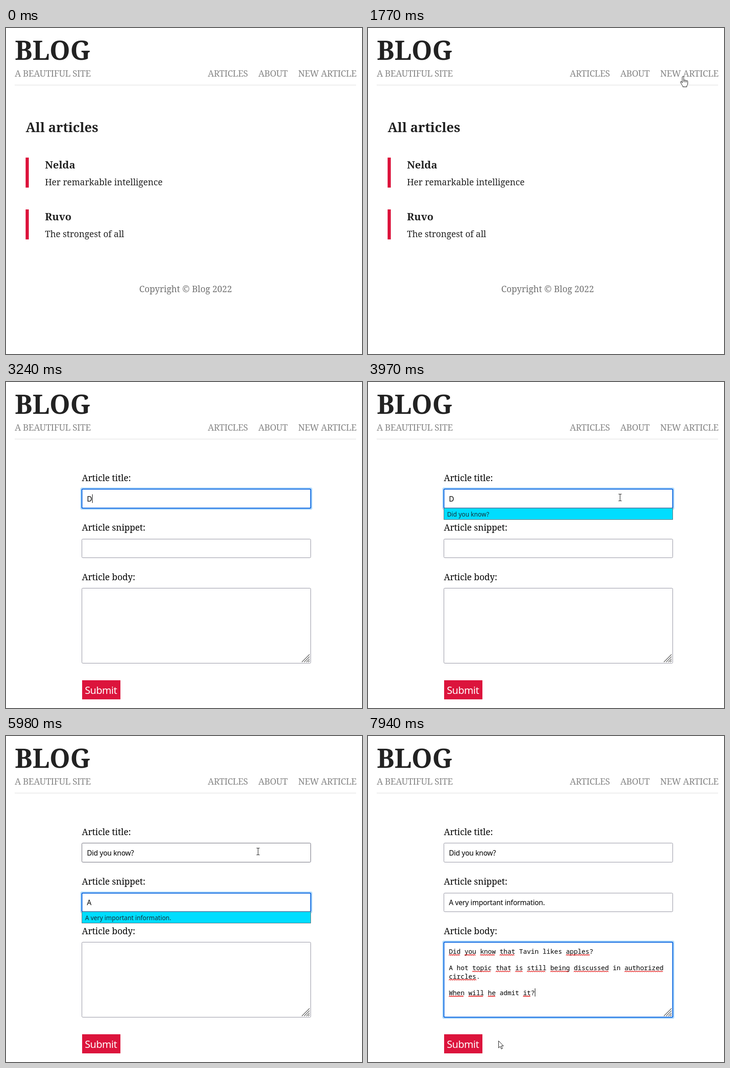
Animation of 781 by 717 pixels, one loop 8 s. Source, as an HTML page:

```html
<!DOCTYPE html>
<html lang="en">
<head>
<meta charset="utf-8">
<title>Blog</title>
<style>
  html, body { margin: 0; width: 100%; height: 100%; overflow: hidden; background: #fff; }
  svg { display: block; }
  text { white-space: pre; fill: #000; font: 19.2px "Noto Serif", serif; }
  .h1 { font-size: 57.6px; font-weight: 700; fill: #222; }
  .h2 { font-size: 28.8px; font-weight: 700; fill: #222; }
  .h3 { font-size: 22.46px; font-weight: 700; fill: #222; }
  .p { fill: #222; }
  .nav { font-weight: 300; fill: #868686; letter-spacing: -.33px; }
  .foot { fill: #707070; text-anchor: middle; }
  .in { font: 15.5px "Noto Sans", sans-serif; letter-spacing: -.22px; }
  .opt { font: 13.5px "Noto Sans", sans-serif; fill: #15303a; }
  .mono { font: 14.27px "Noto Sans Mono", monospace; }
  .btn { font: 22px "Noto Sans", sans-serif; letter-spacing: -.5px; fill: #fff; }
  .field { fill: #fff; stroke: #8f8f9d; }
  .halo { fill: #b5dcfb; }
  .pointer { fill: #fff; stroke: #111; stroke-linejoin: round; }
</style>
</head>
<body>
<svg width="781" height="717" viewBox="0 0 781 717">
  <text class="h1" x="19.2" y="70">BLOG</text>
  <text class="nav" x="19.2" y="107">A BEAUTIFUL SITE</text>
  <text class="nav" x="442.7" y="107">ARTICLES</text>
  <text class="nav" x="553.5" y="107">ABOUT</text>
  <text class="nav" x="641" y="107">NEW ARTICLE</text>
  <path d="M19 125.5H768" stroke="#ddd"/>

  <g id="list">
    <text class="h2" x="43.2" y="229">All articles</text>
    <path d="M43 285h7v66h-7zM43 399h7v66h-7z" fill="#dc143c"/>
    <text class="h3" id="first" x="85.4" y="309">Nelda</text>
    <text class="p" x="85.4" y="346">Her remarkable intelligence</text>
    <text class="h3" id="second" x="85.4" y="423">Ruvo</text>
    <text class="p" x="85.4" y="460">The strongest of all</text>
    <text class="foot" x="394" y="581">Copyright © Blog 2022</text>
  </g>

  <g id="form">
    <text x="166.5" y="218">Article title:</text>
    <text x="166.5" y="327">Article snippet:</text>
    <text x="166.5" y="435.5">Article body:</text>
    <rect class="halo" id="halo" x="163" width="509" rx="4"/>
    <rect class="field" id="title" x="166.5" y="235.5" width="502" height="42" rx="2"/>
    <rect class="field" id="snippet" x="166.5" y="345.5" width="502" height="41" rx="2"/>
    <rect class="field" id="body" x="166.5" y="453.5" width="502" height="165" rx="2"/>
    <path d="M649 616l17-17M654 616l12-12M659 616l7-7M663 616l3-3" stroke="#555" stroke-width="1.2"/>
    <text class="in" id="titleText" x="177.5" y="263"></text>
    <text class="in" id="snippetText" x="177.5" y="372"></text>
    <g id="bodyText"></g>
    <g id="drop">
      <rect id="dropBox" x="166.5" y="277.5" width="502" height="25" stroke="#5f7077"/>
      <text class="opt" id="dropText" x="173.5" y="296"></text>
    </g>
    <rect id="caret" width="1"/>
    <rect x="167" y="656" width="84" height="42" fill="#dc143c"/>
    <text class="btn" x="173" y="685.5">Submit</text>
  </g>

  <g id="cursor">
    <path class="pointer" id="arrow" d="M.5 .5V16L4 12.6L6.5 18.3L9 17.2L6.5 11.7H11.2Z"/>
    <path class="pointer" id="hand" d="M-1.7 14V1.5Q-1.6 -.3 0 -.3T1.7 1.5V8Q3.2 6.3 4.7 8.2Q6.3 6.8 7.7 9Q10.5 8 10.5 11.5V15Q10.5 18 8.4 20V22.5H-.3V20.5Q-2.8 18-5.2 13Q-6 10.6-4.4 10.4Q-3 10.3-1.7 13M1.7 8V12M4.7 8.4V12.4M7.7 9.2V12.6"/>
    <path id="beam" d="M-3.5 -7.5H-1L0 -6.5L1 -7.5H3.5M0 -6.5V6.5M-3.5 7.5H-1L0 6.5L1 7.5H3.5" fill="none" stroke="#222" stroke-width="1.1"/>
  </g>
</svg>
<script>
const $ = id => document.getElementById(id);
const show = (id, on) => $(id).style.display = on ? '' : 'none';
const set = (id, attrs) => { for (const k in attrs) $(id).setAttribute(k, attrs[k]); };
const within = (t, ...spans) => spans.some(([a, b]) => t >= a && t < b);

const LOOP = 8000, OPEN = 2170, CHAR = 8.562;
const TITLE = 'Did you know?', SNIPPET = 'A very important information.';

// Article body, with wavy underlines from the spell checker
const known = ['Tavin', 'likes', 'A', 'hot', 'in', 'admit'];
const lines = [
  [479, 'Did you know that Tavin likes apples?'],
  [515.3, 'A hot topic that is still being discussed in authorized'],
  [533.5, 'circles.'],
  [569.8, 'When will he admit it?']
];
$('bodyText').innerHTML = lines.map(([y, line]) => {
  let wave = '';
  for (const m of line.matchAll(/\w+/g)) {
    if (known.includes(m[0])) continue;
    wave += `M${177.5 + m.index * CHAR} ${y + 3.5}`;
    for (let x = 0; x < m[0].length * CHAR - 3; x += 4) wave += 'l2 -2l2 2';
  }
  return `<text class="mono" x="177.5" y="${y}">${line}</text>
    <path d="${wave}" fill="none" stroke="#e01010" stroke-width="1.1"/>`;
}).join('');

// Mouse path: time, x, y of the hot spot
const moves = [
  [70, 320, 475], [350, 323, 424], [620, 323, 424], [950, 328, 347],
  [1280, 328, 347], [1620, 689, 93], [1770, 691, 107], [OPEN, 691, 107],
  [2570, 557, 250], [2770, 553, 246], [3309, 553, 246], [3310, 553, 254],
  [7320, 436, 508], [7940, 286, 670]
];
const ease = u => u * u * (3 - 2 * u);
function mouseAt(t) {
  if (t >= 3310 && t < 7320) return [553, 254];
  const i = moves.findIndex(m => m[0] > t);
  if (i < 1) return moves[i < 0 ? moves.length - 1 : 0].slice(1);
  const [a, x, y] = moves[i - 1], [b, x2, y2] = moves[i];
  const u = ease((t - a) / (b - a));
  return [x + (x2 - x) * u, y + (y2 - y) * u];
}

function drawCursor(t) {
  const [x, y] = mouseAt(t);
  const onFirst = y > 285 && y < 351, onSecond = y > 399 && y < 465;
  const listed = t < OPEN, seen = within(t, [70, 3240], [3310, 4590], [5650, 6250], [7320, LOOP]);
  const hand = y < 111 || listed && (onFirst || onSecond);
  const overTitle = !listed && y > 236 && y < 278;
  const beam = overTitle || !listed && y > 453 && y < 620;
  show('cursor', seen);
  show('hand', hand);
  show('beam', beam);
  show('arrow', !hand && !beam);
  set('cursor', { transform: `translate(${x.toFixed(1)} ${y.toFixed(1)})` });
  $('first').style.fill = seen && onFirst ? '#dc143c' : '';
  $('second').style.fill = seen && onSecond ? '#dc143c' : '';
  return overTitle && t < 6850;
}

function drawForm(t, hover) {
  const focus = within(t, [2970, 4590]) ? 'title' : within(t, [4590, 6320]) ? 'snippet' : t >= 6320 ? 'body' : '';
  for (const id of ['title', 'snippet', 'body']) {
    const on = id === focus;
    $(id).style.stroke = on ? '#0060df' : id === 'title' && hover ? '#676774' : '';
    $(id).style.strokeWidth = on ? 2 : 1;
  }
  show('halo', focus);
  if (focus) set('halo', { y: $(focus).y.baseVal.value - 3.5, height: $(focus).height.baseVal.value + 7 });

  $('titleText').textContent = t < 3240 ? '' : t < 4320 ? 'D' : TITLE;
  $('snippetText').textContent = t < 5590 ? '' : t < 6250 ? 'A' : SNIPPET;
  show('bodyText', t >= 6850);

  const second = t > 5000;
  show('drop', within(t, [3310, 4320], [5720, 6250]));
  set('dropBox', { y: second ? 386.5 : 277.5, fill: within(t, [3970, 4320], [5980, 6250]) ? '#00ddff' : '#fff' });
  set('dropText', { y: second ? 405 : 296 });
  $('dropText').textContent = second ? SNIPPET : TITLE;

  show('caret', within(t, [3040, 3510], [4040, 4590], [4660, 5190], [5590, 5720], [6320, 6800], [6850, 7120], [7620, LOOP]));
  const [x, y] = t < 3240 ? [178, 247] : t < 4320 ? [189, 247] : t < 4590 ? [283, 247]
    : t < 5590 ? [178, 356] : t < 6250 ? [189, 356] : t < 6850 ? [178, 465] : [366, 555];
  set('caret', { x, y, height: focus === 'body' ? 18 : 19 });
}

function frame(now) {
  const t = now % LOOP;
  show('list', t < OPEN);
  show('form', t >= OPEN);
  drawForm(t, drawCursor(t));
  requestAnimationFrame(frame);
}
frame(0);
</script>
</body>
</html>
```
